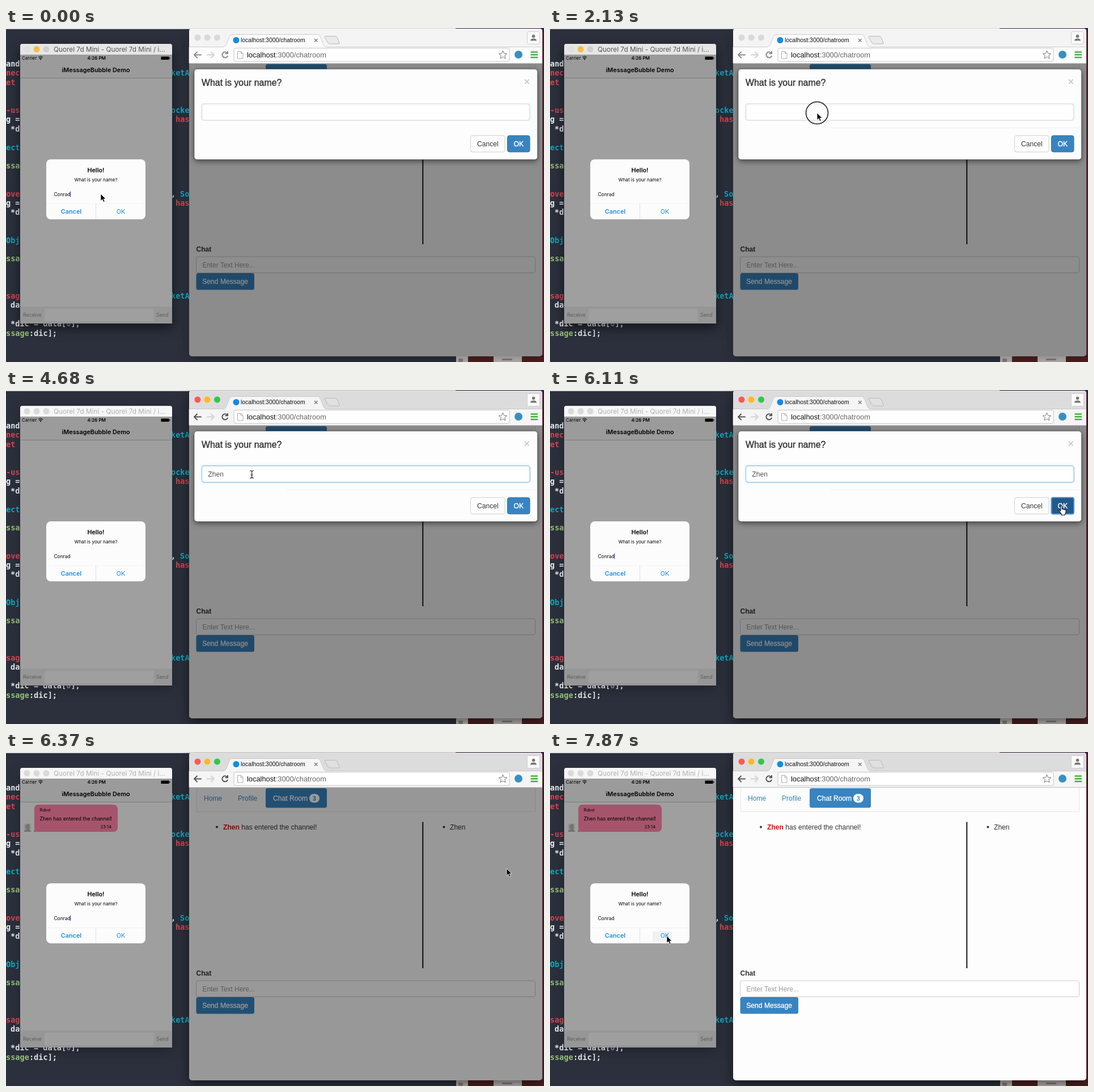
Animation of 949x590 px, one loop 8000 ms. Source, as an HTML page:

```html
<!DOCTYPE html>
<html lang="en">
<head>
<meta charset="utf-8">
<title>Chat room demo</title>
<style>
html, body { margin: 0; width: 949px; height: 590px; overflow: hidden; background: #2b303c; }
svg { display: block; }
text { white-space: pre; }
.code { font: bold 13.6px "DejaVu Sans Mono", monospace; }
.w { fill: #eceef0; }
.r { fill: #dc4350; }
.c { fill: #12a9c0; }
.g { fill: #98c379; }
.ios { font-family: Inter, sans-serif; }
.b { font-weight: 600; font-size: 10.8px; }
.mid { text-anchor: middle; }
.web { font: 12.1px "Liberation Sans", Arial, sans-serif; fill: #333; }
.bold { font-weight: bold; }
.line { fill: none; stroke-linecap: round; stroke-linejoin: round; }

/* every animation shares one 8 s clock */
#stage, .step { animation: 8s step-end infinite; }
.move { animation: 8s linear infinite; }

#stage { animation-name: focus-window; }
@keyframes focus-window {
  0% { --strip: #f4f4f4; --tab: #fdfdfd; --close: #d9d9d9; --min: #d9d9d9; --zoom: #d9d9d9; --nav: #8a8a8a;
       --bar: #e6e6e6; --title: #555; --d1: #e0e0e0; --d2: #fdbc40; --d3: #cfcfcf; --lift: .55; --rise: .25; }
  28.25%, to { --strip: #dcdcdc; --tab: #f5f5f5; --close: #fc5753; --min: #fdb927; --zoom: #33c748; --nav: #555;
       --bar: #f6f6f6; --title: #b2b2b2; --d1: #dadada; --d2: #dadada; --d3: #dadada; --lift: .25; --rise: .55; }
}
.phone { filter: drop-shadow(0 8px 10px rgba(0, 0, 0, var(--lift))); }
.browser { filter: drop-shadow(0 6px 10px rgba(0, 0, 0, var(--rise))); }

.caret { animation-name: blink; }
@keyframes blink {
  0%, 8.4%, 19.6%, 30.9%, 42.1%, 53.4%, 64.6%, 75.9%, 87% { opacity: 1; }
  1.5%, 13.4%, 24.6%, 35.9%, 47.1%, 58.4%, 69.6%, 81%, 91.8%, to { opacity: 0; }
}
.focus { animation-name: focus; }
@keyframes focus { 0% { opacity: 0; } 30%, to { opacity: 1; } }
.caret2 { animation-name: blink2; }
@keyframes blink2 {
  0%, 38%, 58%, 70% { opacity: 0; }
  30%, 43%, 64% { opacity: 1; }
  74%, to { opacity: 0; }
}
.typed { animation-name: type; }
@keyframes type {
  0% { transform: none; }
  45% { transform: translateX(7.4px); }
  48.5% { transform: translateX(14.1px); }
  52% { transform: translateX(20.8px); }
  56%, to { transform: translateX(28px); }
}
.rule { animation-name: rule; }
@keyframes rule { 0% { opacity: 0; } 20.4%, to { opacity: 1; } }
.press { animation-name: press; }
@keyframes press { 0% { opacity: 0; } 74.6%, to { opacity: 1; } }
.modal { animation-name: leave; }
@keyframes leave {
  0%, 77.5% { opacity: 1; transform: none; }
  79.1%, 99.99% { opacity: 0; transform: translateY(-40px); }
}
.dim { animation-name: dim; }
@keyframes dim { 0% { opacity: .45; } 79.2% { opacity: .4; } 81.4%, to { opacity: 0; } }
.joined { animation-name: joined; }
@keyframes joined { 0% { opacity: 0; } 78.7%, to { opacity: 1; } }
.tap { animation-name: tap; }
@keyframes tap { 0% { opacity: 0; } 98.2%, to { opacity: 1; } }

.mouse { animation-name: mouse; }
@keyframes mouse {
  0%, 6% { transform: translate(167px, 293px); }
  17%, 20.4% { transform: translate(430px, 165px); }
  25%, 28.25% { transform: translate(471px, 150px); }
  34.75%, 58.5% { transform: translate(433px, 149px); }
  70%, 77.5% { transform: translate(902px, 205px); }
  79.2%, 80.8% { transform: translate(883px, 206px); }
  81.4%, 91% { transform: translate(535px, 197px); }
  98.3%, 99.99% { transform: translate(206px, 325px); }
}
.arrow { animation-name: arrow; }
@keyframes arrow { 0%, 61.4%, 78% { opacity: 1; } 28.25%, 69.5% { opacity: 0; } to { opacity: 1; } }
.beam { animation-name: beam; }
@keyframes beam { 0%, 44.4%, 61.4%, to { opacity: 0; } 28.25%, 58.5% { opacity: 1; } }
.hand { animation-name: hand; }
@keyframes hand { 0%, 78%, to { opacity: 0; } 69.5% { opacity: 1; } }
.ring { animation-name: ring; }
@keyframes ring { 0%, 28.25%, to { opacity: 0; } 25% { opacity: 1; } }
</style>
</head>
<body>
<svg id="stage" width="949" height="590" viewBox="0 0 949 590">
  <!-- desktop -->
  <rect width="949" height="590" fill="#2b303c"/>
  <rect width="949" height="2" fill="#e4e4e6"/>
  <path d="M793 0h156v8h-156z" fill="#43224e"/>
  <path d="M945 8h4v572h-4z" fill="#552a33"/>
  <path d="M794 578h155v12h-155z" fill="#4c2020"/>
  <path d="M794 578h21v12h-21zM860 578h50v12h-50z" fill="#b9b5b4"/>
  <path d="M798 584h8v6h-8zM875 584h18v3h-18z" fill="#858181"/>

  <!-- editor -->
  <g class="code">
    <text class="w" y="68">and</text>
    <text class="r" y="84.4">nec</text><text class="c" x="291" y="84.4">ketA</text>
    <text class="r" y="100.8">et</text>
    <text class="r" y="150">-us</text><text class="c" x="291" y="150">ocke</text>
    <text class="w" y="166.4">g =</text><text class="r" x="299" y="166.4">has</text>
    <text class="w" x="8" y="182.8">*di</text>
    <text class="c" y="215.6">ect</text>
    <text class="g" y="248.4">ssa</text>
    <text class="r" y="297.6">ove</text><text class="w" x="291" y="297.6">,</text><text class="c" x="307" y="297.6">So</text>
    <text class="w" y="314">g =</text><text class="r" x="299" y="314">has</text>
    <text class="w" x="8" y="330.4">*di</text>
    <text class="c" y="379.6">Obj</text>
    <text class="g" y="412.4">ssa</text>
    <text class="r" y="478">sag</text><text class="c" x="291" y="478">ketA</text>
    <text class="w" x="8" y="494.4">da</text>
    <text class="w" x="8" y="527.2">*dic = data[<tspan fill="#9d7fd0">0</tspan>];</text>
    <text class="g" y="543.6">ssage<tspan class="w">:dic];</tspan></text>
  </g>

  <!-- simulator -->
  <g class="phone ios">
    <path d="M25 522V32q0-4 4-4h260q4 0 4 4v490z" fill="#9f9f9f"/>
    <path d="M25 47V32q0-4 4-4h260q4 0 4 4v15z" style="fill:var(--bar)"/>
    <circle cx="37" cy="37.5" r="5.5" style="fill:var(--d1)"/>
    <circle cx="54" cy="37.5" r="5.5" style="fill:var(--d2)"/>
    <circle cx="71" cy="37.5" r="5.5" style="fill:var(--d3)"/>
    <text x="84" y="41.5" font-size="11.8" style="fill:var(--title)">Quorel 7d Mini - Quorel 7d Mini / i…</text>
    <path d="M25 47h268v41H25z" fill="#9b9b9b"/>
    <path d="M25 88.5h268" stroke="#7b7b7b"/>
    <text x="28" y="56" font-size="8">Carrier</text>
    <path class="line" d="M57.5 51.6q3.5-3 7 0M59 53.5q2-1.7 4 0" stroke="#111" stroke-width="1.2"/>
    <circle cx="61" cy="55.3" r="1"/>
    <text class="mid" x="159.7" y="56" font-size="8" font-weight="600">4:26 PM</text>
    <path d="M273.5 50.5h14v5.5h-14zM288 52h1.3v2.5H288z"/>
    <text class="b mid" x="158.5" y="78">iMessageBubble Demo</text>

    <g class="step joined">
      <rect x="32" y="126" width="12" height="15" fill="#929292"/>
      <path d="M32 141q0-4 4-4.500q-2-2-2-5t4-4t4 4t-2 5q4 .5 4 4.500z" fill="#747474"/>
      <path d="M57 93h132q8 0 8 8v32q0 8-8 8H48q3-2 2-6V101q0-8 7-8z" fill="#a5546c"/>
      <text x="59.5" y="104.5" font-size="7">Robot</text>
      <text x="59.5" y="120.5" font-size="8.9">Zhen has entered the channel!</text>
      <text x="186" y="135" font-size="7.5" text-anchor="end">23:14</text>
    </g>

    <path d="M25 492h268v30H25z" fill="#969696"/>
    <rect x="68" y="496" width="193" height="22" rx="2" fill="#9f9f9f"/>
    <g font-size="8.8" fill="#5c5c5c">
      <text x="30" y="510">Receive</text><text x="265" y="510">Send</text>
    </g>

    <rect x="71" y="232" width="175" height="106" rx="8" fill="#fcfcfc"/>
    <rect class="step tap" x="181" y="317" width="34" height="18" fill="#f1f1f1"/>
    <text class="b mid" x="158.5" y="255">Hello!</text>
    <text class="mid" x="158.5" y="270.5" font-size="8.2">What is your name?</text>
    <text x="84.5" y="296.5" font-size="8.4">Conrad</text>
    <path class="step caret" d="M113.7 288.5v10" stroke="#4168d8" stroke-width="1.1"/>
    <path d="M71 310.5h175" stroke="#f0f0f0"/>
    <path d="M158.5 310v28" stroke="#e2e2e2"/>
    <g fill="#1b8cea">
      <text class="b mid" x="115" y="328">Cancel</text>
      <text class="mid" x="202.5" y="328" font-size="10.8">OK</text>
    </g>
  </g>

  <!-- browser -->
  <g class="web">
    <rect class="browser" x="323" y="1" width="623" height="579" rx="5" fill="#fdfdfd"/>
    <path d="M323 62V6q0-5 5-5h613q5 0 5 5v56z" style="fill:var(--strip)"/>
    <circle cx="338" cy="17" r="5.5" style="fill:var(--close)"/>
    <circle cx="355" cy="17" r="5.5" style="fill:var(--min)"/>
    <circle cx="372.5" cy="17" r="5.5" style="fill:var(--zoom)"/>
    <path d="M562 16q0-1.500 2-1.500h17q2 0 3 2l4 9.500q1 2-1 2h-16q-2 0-3-2z" fill="#e3e3e3" fill-opacity=".6" stroke="#b9b9b9"/>
    <path d="M323 33.500h60q4 0 6-5l5-13q1.500-4 5-4h150q4 0 5.500 4l5 13q2 5 6 5h380V62H323z" style="fill:var(--tab)" stroke="#c2c2c2" stroke-width=".8"/>
    <path d="M323 34h623v28H323z" style="fill:var(--tab)"/>
    <path d="M323 62.500h623" stroke="#bdbdbd"/>
    <circle cx="406" cy="21.5" r="5.5" fill="#178ae0"/>
    <text x="414" y="25" font-size="10.45" fill="#111">localhost:3000/chatroom</text>
    <path d="M544 19l5.500 5.500m0-5.500L544 24.500" stroke="#777" stroke-width="1.3"/>
    <rect x="919.5" y="6.5" width="22" height="22" rx="2" fill="#fafafa" stroke="#cfcfcf"/>
    <circle cx="930.5" cy="14.5" r="2.8" fill="#777"/>
    <path d="M925 22.500q0-4 5.500-4t5.500 4z" fill="#777"/>
    <g class="line" stroke-width="2">
      <path d="M344 47.500h-12m5-5l-5 5l5 5" style="stroke:var(--nav)"/>
      <path d="M355 47.500h12m-5-5l5 5l-5 5" stroke="#d2d2d2"/>
      <path d="M390.500 44.500a5 5 0 1 0 .3 5.200m.2-8v3.600h-3.600" style="stroke:var(--nav)"/>
    </g>
    <rect x="402" y="35.5" width="486" height="23.5" rx="2.5" fill="#fff" stroke="#c4c4c4"/>
    <path d="M408.500 41.500h6l3.500 3.500v9h-9.500zM414.500 41.500v3.500h3.500" fill="#fff" stroke="#aaa"/>
    <text x="425" y="52" font-size="12.85" fill="#666"><tspan fill="#111">localhost</tspan>:3000/chatroom</text>
    <path d="M876.500 40l2 5 5.300.3-4.100 3.400 1.400 5.200-4.600-2.900-4.600 2.900 1.400-5.200-4.100-3.400 5.300-.3z" fill="#fff" stroke="#777"/>
    <circle cx="904" cy="47" r="7" fill="#3a8fbe"/>
    <path d="M925.500 42.500h12.500m-12.500 4.700h12.500m-12.500 4.700h12.500" stroke="#45ad3d" stroke-width="2.5"/>

    <path d="M336.500 63v42.500h597V63" fill="#fcfcfc" stroke="#e7e7e7"/>
    <g fill="#3884c0">
      <text x="349" y="85.5">Home</text><text x="409" y="85.5">Profile</text>
      <rect x="458" y="64" width="108" height="34.5" rx="3.5"/>
      <rect x="535" y="74" width="18" height="15.5" rx="7.7" fill="#fff"/>
      <text class="bold mid" x="544" y="85.6" font-size="10.5">3</text>
    </g>
    <text x="471" y="85.5" fill="#fff" stroke="#fff" stroke-width=".3">Chat Room</text>
    <g class="step joined">
      <circle cx="372" cy="132.5" r="2"/><circle cx="772.5" cy="132.5" r="2"/>
      <text x="383" y="136.5"><tspan class="bold" fill="#f00612">Zhen</tspan> has entered the channel!</text>
      <text x="783" y="136.5">Zhen</text>
    </g>
    <path d="M735.300 123.500V382" stroke="#000" stroke-width="1.8"/>
    <text class="bold" x="335.5" y="395">Chat</text>
    <rect x="335.5" y="404" width="598" height="28.5" rx="3.5" fill="#fff" stroke="#ccc"/>
    <text x="346.5" y="422.8" font-size="11.9" fill="#999">Enter Text Here...</text>
    <rect x="335.5" y="433" width="102.5" height="29.5" rx="3.5" fill="#3884c0"/>
    <text x="346.3" y="452" fill="#fff" stroke="#fff" stroke-width=".3">Send Message</text>
    <path class="step dim" d="M323 63h623v512q0 5-5 5H328q-5 0-5-5z" fill="#000"/>

    <g class="move modal">
      <rect x="332" y="72.5" width="605.5" height="160" rx="5" fill="#fdfdfd" stroke="#000" stroke-opacity=".4"
        style="filter:drop-shadow(0 3px 5px rgba(0,0,0,.5))"/>
      <text x="345" y="102" font-size="15.9" stroke="#333" stroke-width=".4">What is your name?</text>
      <path d="M915 91l7.500 7.500m0-7.500l-7.500 7.500" stroke="#ccc" stroke-width="1.8"/>
      <rect x="345.5" y="134" width="578.5" height="29" rx="3.5" fill="#fff" stroke="#ccc"/>
      <rect class="step focus" x="345.5" y="134" width="578.5" height="29" rx="3.5" fill="#fff" stroke="#7dbbe8"
        style="filter:drop-shadow(0 0 2px rgba(102,175,233,.3))"/>
      <text x="356.3" y="152.7" fill="#555">Zhen</text>
      <g class="step typed">
        <rect x="356" y="137" width="32" height="23" fill="#fff"/>
        <path class="step caret2" d="M356.700 141.500v14" stroke="#222"/>
      </g>
      <path class="step rule" d="M495 176.500h442" stroke="#eee"/>
      <rect x="819.5" y="190" width="60.5" height="29" rx="3.5" fill="#fff" stroke="#ccc"/>
      <text x="831" y="209">Cancel</text>
      <rect x="884.5" y="190" width="39.5" height="29" rx="3.5" fill="#3884c0" stroke="#2e6da4"/>
      <rect class="step press" x="884.5" y="190" width="39.5" height="29" rx="3" fill="#23598a" stroke="#4a92d2" stroke-width="2"/>
      <text x="895.5" y="209" fill="#fff" stroke="#fff" stroke-width=".4">OK</text>
    </g>
  </g>

  <!-- pointer -->
  <g class="move mouse">
    <circle class="step ring" r="19.5" fill="none" stroke="#111" stroke-width="1.5"/>
    <path class="step arrow" d="M0 0v12.500l2.900-2.700l2.100 4.700l2.200-1l-2.100-4.500h4z" fill="#000" stroke="#fff" stroke-width=".8"/>
    <path class="step beam line" d="M-3-6.500q3 0 3 2q0-2 3-2M0-4.500v9M-3 6.500q3 0 3-2q0 2 3 2M-1.500 1h3" stroke="#111" stroke-width="1.2"/>
    <path class="step hand" d="M-1.500 1q0-1.500 1.300-1.500t1.300 1.500v4.500q2-1.200 2.600.4q2-.8 2.500.8q2-.4 2 1.500q0 4-2 6.300v1.500h-6v-1.500l-4.200-6q-.7-1.600.8-1.700l1.700 1.700z" fill="#fff" stroke="#111" stroke-width="1.1"/>
  </g>
</svg>
</body>
</html>
```
